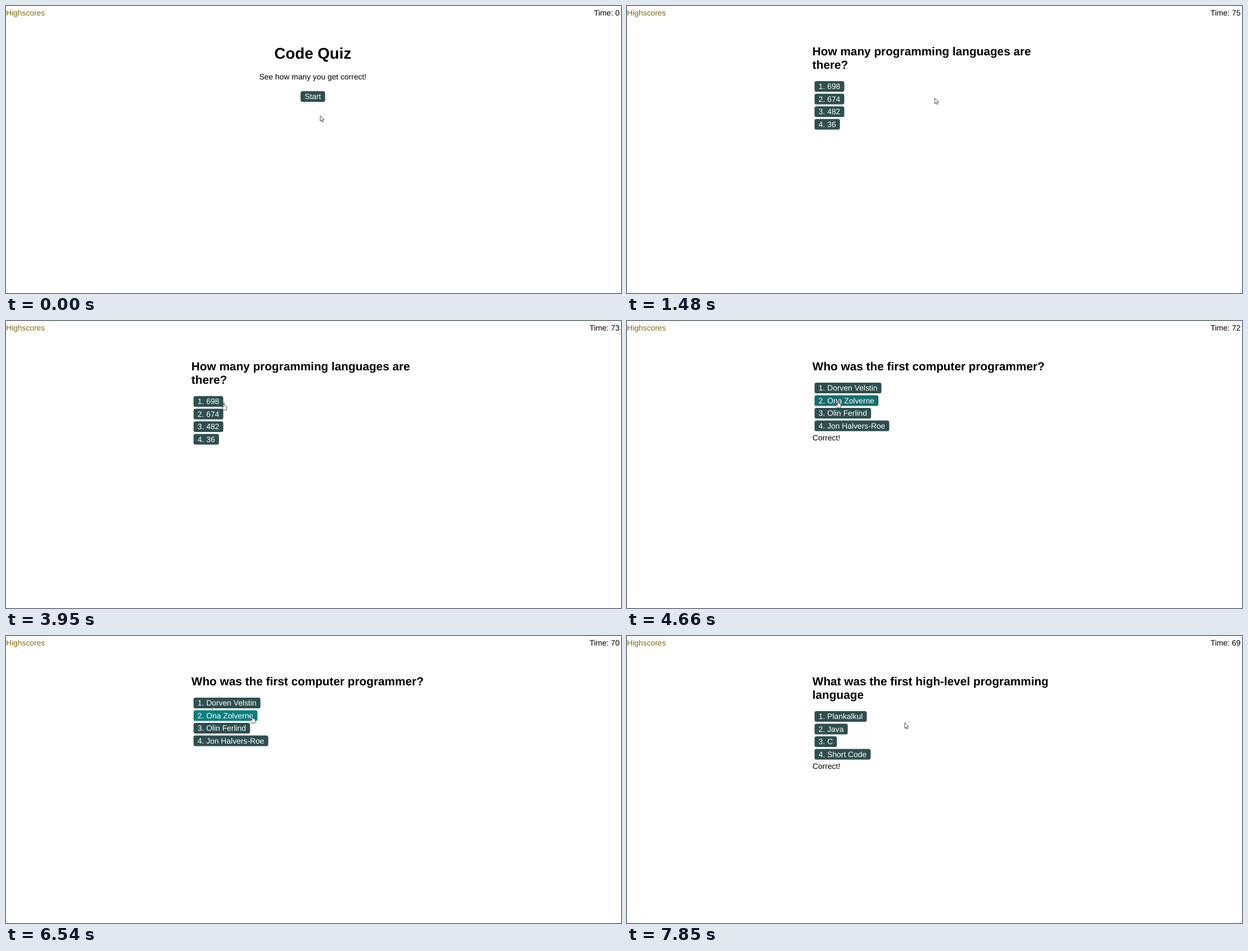
An HTML page for the animation above (8000 ms loop, 1094 by 512 pixels).

```html
<!DOCTYPE html>
<html lang="en">
<head>
<meta charset="utf-8">
<title>Code Quiz</title>
<style>
  html, body { margin: 0; width: 100%; height: 100%; overflow: hidden; background: #fff; }
  svg { display: block; font: 13.85px "Liberation Sans", Arial, sans-serif; text-rendering: geometricPrecision; }
  .h1 { font-size: 27.7px; font-weight: bold; }
  .h2 { font-size: 20.78px; font-weight: bold; }
  .mid { text-anchor: middle; }
  .end { text-anchor: end; }
  .label { fill: #fff; }
  .link { fill: #806b14; }
  #cursor path { fill: #fff; stroke: #222; stroke-width: .8; stroke-linejoin: round; }
</style>
</head>
<body>
<svg id="stage" width="1094" height="512" viewBox="0 0 1094 512"></svg>
<script>
const LOOP = 8000, FADE = 200, PAD = 7.2, PITCH = 22.5, CENTER = 545.8;
const stage = document.getElementById('stage');

function add(parent, tag, attrs = {}, text = '') {
  const node = document.createElementNS('http://www.w3.org/2000/svg', tag);
  for (const key in attrs) node.setAttribute(key, attrs[key]);
  node.textContent = text;
  return parent.appendChild(node);
}
const addText = (parent, x, y, text, cls = '') => add(parent, 'text', { x, y, class: cls }, text);
const show = (node, on) => node.setAttribute('visibility', on ? 'inherit' : 'hidden');

const buttons = [];
// hovers: list of [enter, leave] times
function addButton(parent, x, y, text, hovers = [], centered = false) {
  const rect = add(parent, 'rect', { y, height: 19, rx: 3.6 });
  const label = addText(parent, 0, y + 14.3, text, 'label');
  const width = label.getComputedTextLength() + 2 * PAD;
  const left = centered ? x - width / 2 : x;
  rect.setAttribute('x', left);
  rect.setAttribute('width', width);
  label.setAttribute('x', left + PAD);
  buttons.push({ rect, hovers });
}

const screens = [];
function addScreen(from, to) {
  const group = add(stage, 'g');
  screens.push({ group, from, to });
  return group;
}
function addQuestion(from, to, lines, answers, hovered, hovers, correctUntil = 0) {
  const group = addScreen(from, to);
  lines.forEach((line, i) => addText(group, 329.8, 87.5 + 24 * i, line, 'h2'));
  const top = 86 + 24 * lines.length;
  answers.forEach((answer, i) =>
    addButton(group, 333.6, top + PITCH * i, `${i + 1}. ${answer}`, i === hovered ? hovers : []));
  if (correctUntil) {
    const note = addText(group, 330, top + 103, 'Correct!');
    screens.push({ group: note, from, to: correctUntil });
  }
}

addText(stage, 0, 17, 'Highscores', 'link');
const timer = addText(stage, 1091.4, 17, '', 'end');

const intro = addScreen(0, 1480);
addText(intro, CENTER, 93.8, 'Code Quiz', 'h1 mid');
addText(intro, CENTER, 131.3, 'See how many you get correct!', 'mid');
addButton(intro, CENTER, 152, 'Start', [[1040, 1480]], true);

addQuestion(1480, 4600, ['How many programming languages are', 'there?'],
  ['698', '674', '482', '36'], 0, [[3940, 4600]]);
addQuestion(4600, 6890, ['Who was the first computer programmer?'],
  ['Dorven Velstin', 'Ona Zolverne', 'Olin Ferlind', 'Jon Halvers-Roe'],
  1, [[4600, 5960], [6440, 6890]], 5600);
addQuestion(6890, LOOP, ['What was the first high-level programming', 'language'],
  ['Plankalkul', 'Java', 'C', 'Short Code'], 0, [[6890, 7520]], LOOP);

const cursor = add(stage, 'g', { id: 'cursor' });
const arrow = add(cursor, 'path', { d: 'M0 .3V10.3L2.2 8.3 3.9 11.6 5.4 10.9 3.9 7.5H6.8Z' });
const hand = add(cursor, 'path', {
  d: 'M-1 1a1 1 0 0 1 2 0V5l3 .7q1.4.5 1.2 2.2L4.5 11V13H-1.3V11.7L-4 8.1q-.6-1.2.6-1.4L-1 8Z'
});

// time, x, y of the pointer tip
const path = [
  [280, 559, 195.5], [1100, 549, 167.5], [1150, 547.5, 164],
  [1980, 547.5, 164], [2370, 486, 159.3],
  [2990, 486, 159.3], [3800, 391.3, 148], [3850, 390, 147], [3950, 387.5, 145.8], [4220, 375.5, 142],
  [5500, 375.5, 142], [5960, 448, 145], [6170, 455, 146],
  [6430, 455, 146], [6490, 444, 144], [6540, 438.5, 142.5], [6850, 405, 143],
  [7420, 405, 143], [7850, 494, 154.5]
];
function pointerAt(t) {
  const i = path.findIndex(key => key[0] > t);
  if (i === 0) return path[0].slice(1);
  if (i < 0) return path[path.length - 1].slice(1);
  const [a, b] = [path[i - 1], path[i]];
  const k = (t - a[0]) / (b[0] - a[0]);
  return [1, 2].map(n => a[n] + (b[n] - a[n]) * k);
}

// The CSS "ease" curve, cubic-bezier(.25, .1, .25, 1)
function ease(x) {
  if (x <= 0) return 0;
  if (x >= 1) return 1;
  const bezier = (s, p, q) => 3 * s * (1 - s) ** 2 * p + 3 * s * s * (1 - s) * q + s ** 3;
  let low = 0, high = 1;
  for (let i = 0; i < 20; i++) {
    const mid = (low + high) / 2;
    if (bezier(mid, .25, .25) < x) low = mid; else high = mid;
  }
  return bezier(low, .1, 1);
}
function buttonColor(level) {
  const mix = (a, b) => Math.round(a + (b - a) * level);
  return `rgb(${mix(47, 0)},${mix(79, 139)},${mix(79, 139)})`;
}

function draw(t) {
  for (const { group, from, to } of screens) show(group, t >= from && t < to);
  timer.textContent = 'Time: ' + (t < 1480 ? 0 : 75 - Math.max(0, Math.floor((t - 1490) / 1000)));

  let pointing = false;
  for (const { rect, hovers } of buttons) {
    let level = 0;
    for (const [enter, leave] of hovers) {
      level += ease((t - enter) / FADE) - ease((t - leave) / FADE);
      if (t >= enter && t < leave) pointing = true;
    }
    rect.setAttribute('fill', buttonColor(level));
  }
  show(hand, pointing);
  show(arrow, !pointing);
  cursor.setAttribute('transform', `translate(${pointerAt(t)})`);
}

const start = performance.now();
function tick() {
  draw((performance.now() - start) % LOOP);
  requestAnimationFrame(tick);
}
tick();
</script>
</body>
</html>
```
